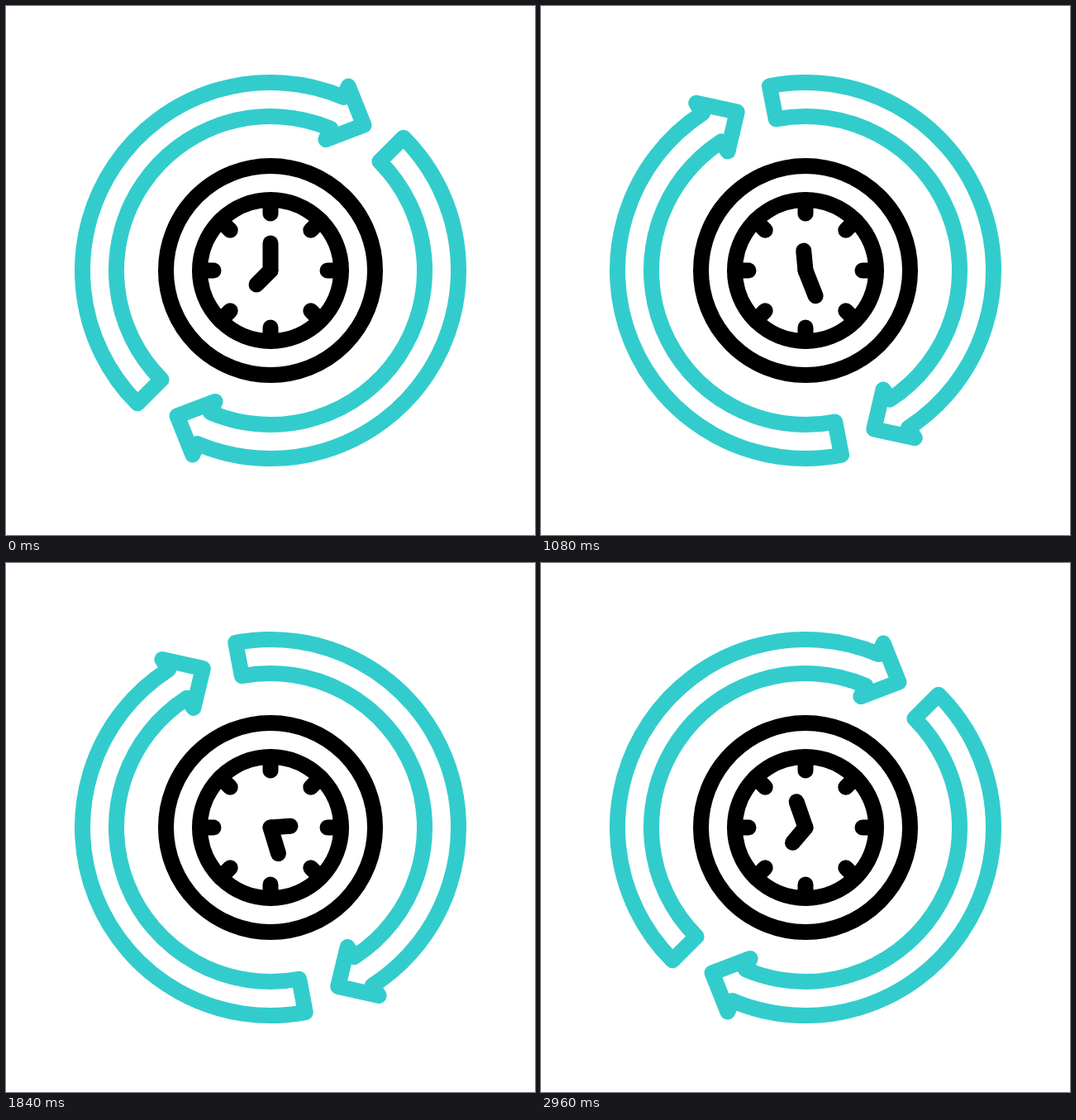
An HTML page that plays this animation: 640x640 px, repeating every 3000 ms.

```html
<!DOCTYPE html>
<html lang="en">
<head>
<meta charset="utf-8">
<title>Clock cycle</title>
<style>
  html, body { margin: 0; width: 100%; height: 100%; overflow: hidden; background: #fff; }
  svg { display: block; width: 100vw; height: 100vh; }
</style>
</head>
<body>
<svg viewBox="-320 -320 640 640" fill="none" stroke="#000" stroke-width="19"
     stroke-linecap="round" stroke-linejoin="round">
  <g id="arrows" stroke="#33cccc"></g>
  <circle r="126.5"/>
  <circle r="85.5"/>
  <path id="ticks"/>
  <path id="hourHand" d="M0 0V-24"/>
  <path id="minuteHand" d="M0 0V-33"/>
</svg>
<script>
const LOOP = 3000, STEP = 40, SPIN = 2800;
const OUTER = 227.5, INNER = 186.5;
const HEAD = 22.9, TAIL = 225;
const $ = id => document.getElementById(id);

// Polar point, degrees clockwise from the top
function at(r, deg) {
  const a = deg * Math.PI / 180;
  return `${(r * Math.sin(a)).toFixed(2)} ${(-r * Math.cos(a)).toFixed(2)}`;
}

const arrow = [
  `M${at(INNER, HEAD)}`,
  `A${INNER} ${INNER} 0 0 0 ${at(INNER, TAIL)}`,
  `L${at(OUTER, TAIL)}`,
  `A${OUTER} ${OUTER} 0 0 1 ${at(OUTER, HEAD)}`,
  `L${at(242, HEAD)} ${at(209, 32.7)} ${at(172, HEAD)}Z`
].join("");
$("arrows").innerHTML = [0, 180]
  .map(deg => `<path d="${arrow}" transform="rotate(${deg})"/>`).join("");

$("ticks").setAttribute("d", Array.from({ length: 8 },
  (_, i) => `M${at(85, i * 45)}L${at(69, i * 45)}`).join(""));

const bezier = (a, b, s) => 3 * (1 - s) * (1 - s) * s * a + 3 * (1 - s) * s * s * b + s * s * s;

// Swings back a little, then sweeps forward and settles
function ease(x) {
  if (x >= 1) return 1;
  let lo = 0, hi = 1;
  for (let i = 0; i < 30; i++) {
    const mid = (lo + hi) / 2;
    if (bezier(0.424, 0.345, mid) < x) lo = mid; else hi = mid;
  }
  return bezier(-0.235, 1, lo);
}

const turn = (id, deg) => $(id).setAttribute("transform", `rotate(${deg.toFixed(3)})`);

function draw(now) {
  const t = Math.floor((now % LOOP) / STEP) * STEP;
  turn("arrows", 360 * ease(t / SPIN));
  turn("hourHand", 225 + 360 * t / LOOP);
  turn("minuteHand", 4 * 360 * t / LOOP);
}

let start;
function tick(now) {
  start ??= now;
  draw(now - start);
  requestAnimationFrame(tick);
}
draw(0);
requestAnimationFrame(tick);
</script>
</body>
</html>
```
